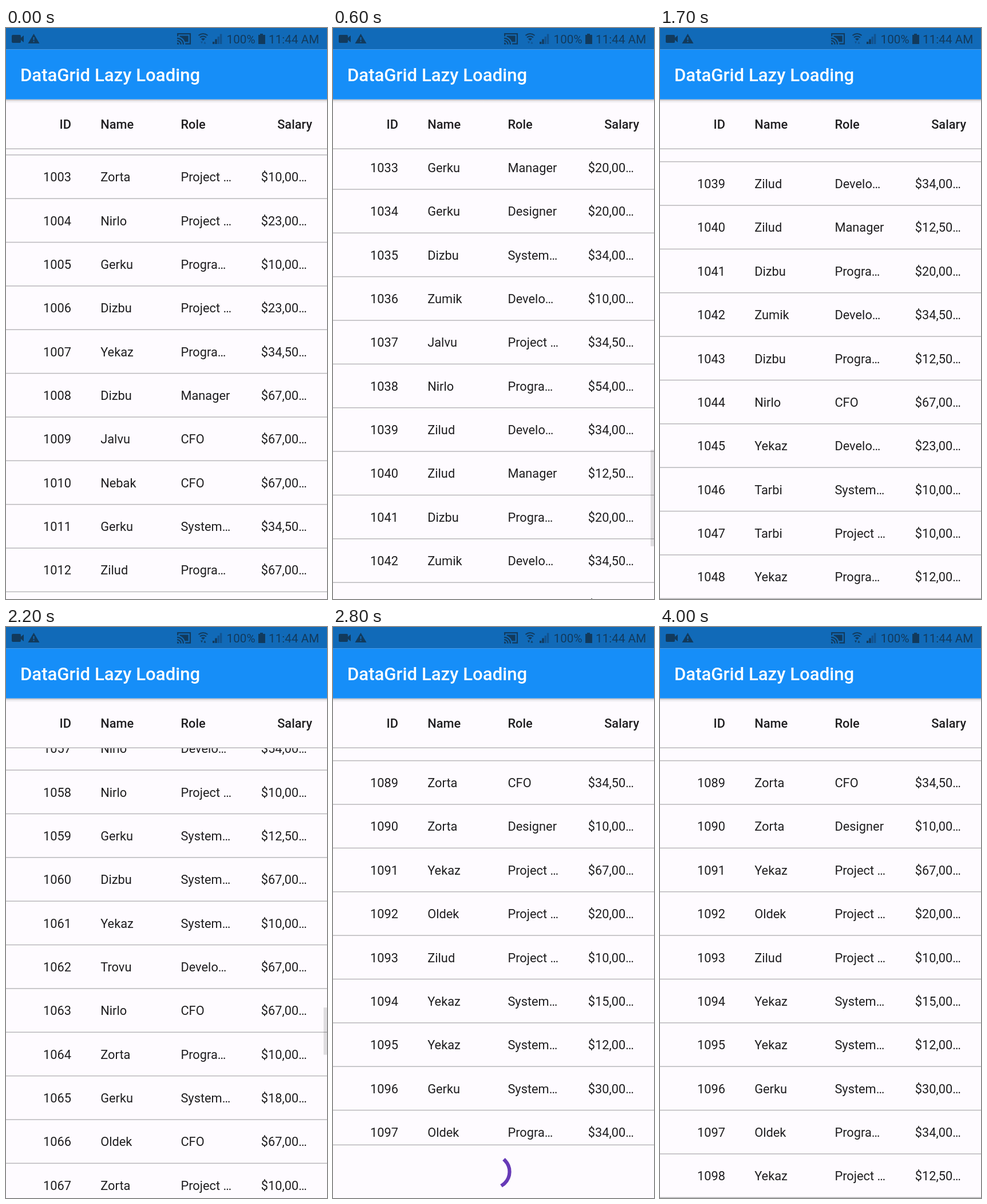
An HTML page with a canvas that plays this animation: 561x998 px, repeating every 5000 ms.

```html
<!DOCTYPE html>
<html lang="en">
<head>
<meta charset="utf-8">
<title>DataGrid Lazy Loading</title>
<style>
  html, body { margin: 0; width: 100%; height: 100%; overflow: hidden; background: #fefbff; }
  canvas { display: block; }
</style>
</head>
<body>
<canvas id="stage" width="561" height="998"></canvas>
<script>
const W = 561, H = 998, DP = W / 360;
const STATUS = 24 * DP, BAR = 80 * DP, TOP = 136 * DP, ROW = 49 * DP, VIEW = H - TOP, FIRST_ID = 1001;
const BG = '#fefbff', INK = '#1f1e20', LINE = '#b9b8bb', ICON = '#123a5c', FAINT = '#125390', DARK_BLUE = '#116ab8';
const ctx = document.getElementById('stage').getContext('2d');

const ROLES = { P: 'Project …', G: 'Progra…', S: 'System…', D: 'Develo…', X: 'Designer', M: 'Manager', C: 'CFO' };
// First id of each block, then "name role salary-in-thousands" per row.
const BLOCKS = {
  1003: 'Zorta P 10,Nirlo P 23,Gerku G 10,Dizbu P 23,Yekaz G 34.5,Dizbu M 67,Jalvu C 67,Nebak C 67,Gerku S 34.5,Zilud G 67',
  1025: 'Kivna X 34.5,Jalvu S 20,Jalvu C 30,Kivna X 20,Nebak C 12.5,Clabu M 12,Zumik S 10,Nirlo C 10,Gerku M 20,' +
        'Gerku X 20,Dizbu S 34,Zumik D 10,Jalvu P 34.5,Nirlo G 54,Zilud D 34,Zilud M 12.5,Dizbu G 20,Zumik D 34.5,' +
        'Dizbu G 12.5,Nirlo C 67,Yekaz D 23,Tarbi S 10,Tarbi P 10',
  1057: 'Nirlo D 54,Nirlo P 10,Gerku S 12.5,Dizbu S 67,Yekaz S 10,Trovu D 67,Nirlo C 67,Zorta G 10,Gerku S 18,Oldek C 67,Zorta P 10',
  1089: 'Zorta C 34.5,Zorta X 10,Yekaz P 67,Oldek P 20,Zilud P 10,Yekaz S 15,Yekaz S 12,Gerku S 30,Oldek G 34,Yekaz P 12.5'
};
const staff = {};
for (const start in BLOCKS)
  BLOCKS[start].split(',').forEach((row, i) => staff[+start + i] = row.split(' '));
const known = Object.values(staff);
for (let id = FIRST_ID; id < FIRST_ID + 100; id++) {
  const pick = k => known[id * k % known.length];
  staff[id] ??= [pick(7)[0], pick(11)[1], pick(17)[2]];
}

const END1 = 48 * ROW - VIEW, END2 = 98 * ROW - VIEW, MID = 4313.5;

// Each fling slows down evenly until it hits the end of the loaded rows.
const fling = (from, speed, t, end) => Math.min(end, from + speed * t - 0.00235 * t * t);

function scrollAt(t) {
  if (t < 1900) return fling(142.1, 5.255, Math.min(t, 1000), END1);
  if (t < 2200) return END1 + (MID - END1) * ((t - 1900) / 300) ** 1.4;
  return fling(MID, 6.9, Math.min(t - 2200, 500), END2);
}

function rect(x, y, w, h, color) {
  ctx.fillStyle = color;
  ctx.fillRect(x, y, w, h);
}

function text(str, x, y, { size = 14 * DP, weight = 400, color = INK, align = 'left' } = {}) {
  ctx.font = `${weight} ${size}px Roboto, sans-serif`;
  ctx.textAlign = align;
  ctx.fillStyle = color;
  ctx.fillText(str, x, y);
}

function shape(d, color = ICON) {
  ctx.fillStyle = color;
  ctx.fill(new Path2D(d));
}

function outline(d, width) {
  ctx.strokeStyle = ICON;
  ctx.lineWidth = width;
  ctx.stroke(new Path2D(d));
}

function drawRows(scroll) {
  const from = Math.floor(scroll / ROW);
  for (let i = from; i < from + 12; i++) {
    const id = FIRST_ID + i, bottom = TOP + (i + 1) * ROW - scroll;
    const [name, role, pay] = staff[id] || [];
    if (!name) break;
    const y = bottom - ROW / 2 + 7.5;
    text(id, 114, y, { align: 'right' });
    text(name, 165.2, y);
    text(ROLES[role], 305.4, y);
    text(`$${Math.floor(pay)},${pay % 1 ? '50' : '00'}…`, 445.7, y);
    rect(0, bottom - 1.5, W, 1.5, LINE);
  }
}

function drawThumb(t, scroll) {
  if (t < 100 || t >= 3400 || (t >= 1700 && t < 2000)) return;
  const k = VIEW / ((t < 1700 ? 48 : 98) * ROW);
  rect(555, TOP + scroll * k, 6, VIEW * k, 'rgba(0,0,0,.12)');
}

// Material "fast out, slow in" curve
function fastOutSlowIn(x) {
  let lo = 0, hi = 1;
  for (let i = 0; i < 24; i++) {
    const u = (lo + hi) / 2, v = 1 - u;
    if (1.2 * v * v * u + 0.6 * v * u * u + u ** 3 < x) lo = u; else hi = u;
  }
  return 3 * (1 - lo) * lo * lo + lo ** 3;
}

function drawLoader(age) {
  rect(0, 904.5, W, H - 904.5, BG);
  rect(0, 904.5, W, 1.5, LINE);
  const start = -Math.PI / 2 + 2 * Math.PI * age / 2222 + Math.PI / 2 * age / 1333;
  ctx.beginPath();
  ctx.arc(280.5, 952, 18 * DP, start, start + 1.5 * Math.PI * fastOutSlowIn(age / 666.5));
  ctx.lineWidth = 4 * DP;
  ctx.lineCap = 'square';
  ctx.strokeStyle = '#673ab7';
  ctx.stroke();
  ctx.lineCap = 'butt';
}

function drawCast() {
  ctx.save();
  ctx.translate(298, 5.8);
  ctx.scale(1.09, 1.09);
  shape('M1 18V21H4A3 3 0 0 0 1 18ZM1 14V16A5 5 0 0 1 6 21H8A7 7 0 0 0 1 14ZM1 10V12A9 9 0 0 1 10 21H12A11 11 0 0 0 1 10Z' +
        'M19 7H5V8.6A13 13 0 0 1 13.4 17H19Z');
  outline('M2 8V4H22V20H14', 2);
  ctx.restore();
}

function drawStatus(t) {
  rect(0, 0, W, STATUS, DARK_BLUE);
  shape('M12 12H24Q26 12 26 14V17L31 13V25L26 21V24Q26 26 24 26H12Q10 26 10 24V14Q10 12 12 12Z');
  shape('M48.5 10L58.5 27H38.5Z');
  rect(47.5, 16, 2, 5, DARK_BLUE);
  rect(47.5, 22.5, 2, 2, DARK_BLUE);
  drawCast();

  outline('M336.5 13Q344.5 7 352.5 13M339 16.5Q344.5 12.5 350 16.5', 2);
  shape('M341 19Q344.5 16.5 348 19L344.5 22Z');
  const busy = (t >= 2000 && t < 3100) || t >= 4000;
  shape('M340 23.5H344L342 27.5ZM345.5 27.5H349.5L347.5 23.5Z', busy ? ICON : FAINT);

  for (let i = 0; i < 4; i++) {
    const h = 4 + i * 4.5;
    rect(361 + i * 4.3, 28 - h, 3.4, h, i < 2 ? ICON : FAINT);
  }
  shape('M444 10H449V12H453V28H441V12H444Z');
  const label = { size: 20.7, color: ICON };
  text('100%', 385.5, 27, label);
  text('11:44 AM', 459, 27, label);
}

function drawBars(t) {
  rect(0, BAR, W, TOP - BAR, BG);
  rect(0, TOP - 1.5, W, 1.5, LINE);
  const shade = ctx.createLinearGradient(0, BAR, 0, BAR + 7);
  shade.addColorStop(0, 'rgba(0,0,0,.3)');
  shade.addColorStop(0.4, 'rgba(0,0,0,.08)');
  shade.addColorStop(1, 'rgba(0,0,0,0)');
  rect(0, BAR, W, 7, shade);
  rect(0, STATUS, W, BAR - STATUS, '#168ef8');
  text('DataGrid Lazy Loading', 24.9, 92.5, { size: 20 * DP, weight: 500, color: '#fff' });
  const head = { weight: 500 }, right = { weight: 500, align: 'right' };
  text('ID', 114, 176, right);
  text('Name', 165.2, 176, head);
  text('Role', 305.4, 176, head);
  text('Salary', 535, 176, right);
  drawStatus(t);
}

function draw() {
  const t = Math.floor(performance.now() % 5000 / 100) * 100;
  const scroll = scrollAt(t);
  rect(0, 0, W, H, BG);
  drawRows(scroll);
  drawThumb(t, scroll);
  for (const start of [900, 2600])
    if (t > start && t < start + 500) drawLoader(t - start);
  drawBars(t);
  requestAnimationFrame(draw);
}
draw();
</script>
</body>
</html>
```
